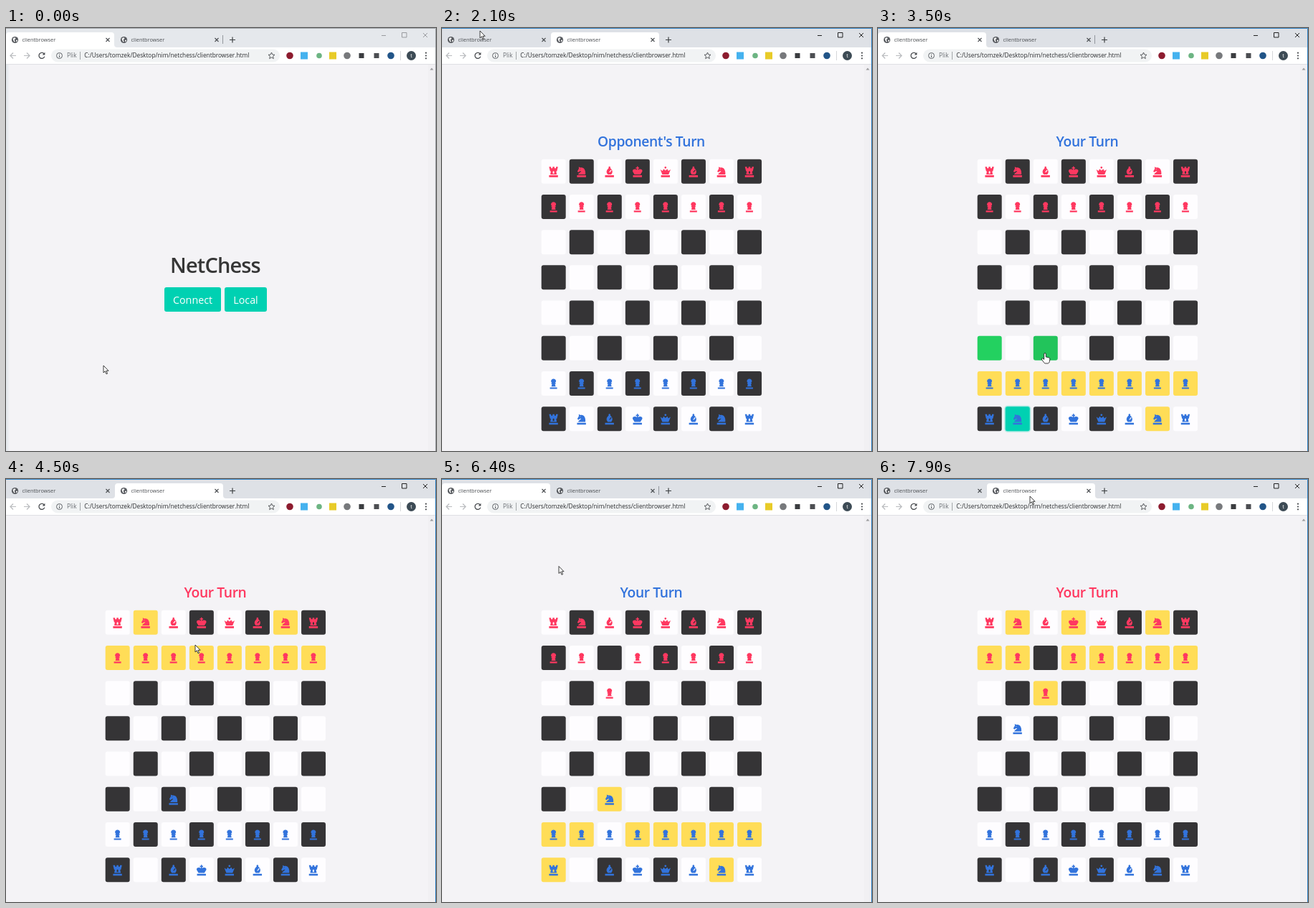
An HTML page for the animation above (8 s loop, 600 by 589 pixels).

```html
<!DOCTYPE html>
<html lang="pl">
<head>
<meta charset="utf-8">
<title>clientbrowser</title>
<style>
  html, body { margin: 0; width: 100%; height: 100%; overflow: hidden; background: #f4f3f6; }
  svg { display: block; width: 600px; height: 589px; }
  text { font-family: "Open Sans", "Noto Sans", sans-serif; }
  .tab { font-size: 7.4px; fill: #4a4d51; }
  .url { font-size: 8.3px; fill: #2b2d30; }
  .btn { font-size: 14.3px; fill: #fff; text-anchor: middle; }
  .logo { font-size: 29px; font-weight: 600; letter-spacing: -.85px; fill: #363636; text-anchor: middle; }
  .turn { font-size: 19.3px; font-weight: 600; letter-spacing: -.4px; text-anchor: middle; }
</style>
</head>
<body>
<svg id="stage" viewBox="0 0 600 589"></svg>
<script>
const LOOP = 8000, STEP = 100;
const RED = '#ff3860', BLUE = '#3273dc';
const FILL = {
  light: ['#fefdff', '#f8f7f9'],
  dark: ['#353436', '#2e2d2f'],
  movable: ['#ffdd57', '#ffd942'],
  target: ['#23d160', '#22c45b'],
  picked: ['#00d1b2', '#00c4a7']
};

// Icons are drawn around 0,0 and share the evenodd rule.
const BASE = 'M-6.2 4.8h12.4v2.6h-12.4z';
const ICONS = {
  R: 'M-6.2-7h2.8v2h2.1v-2h2.6v2h2.1v-2h2.8l-1.5 6.2h-1l.8 4.4h-9l.8-4.4h-1zM-1 0v2.4h2v-2.4a1 1 0 0 0-2 0z' + BASE,
  N: 'M-4.6 3.6C-3.8 1.2-.6.8-.6-1.3L-3.4-.2-4.2.8-5.8-.6-3.7-4.4-3.8-7-1.6-5.8C3-7 6.2-2.4 5.4 3.6zM-2.6-3.7l1.4-.6-.4 1z' + BASE,
  B: 'M0-7.6a1.4 1.4 0 0 1 1 2.3C3.6-3 5-.6 3.4 2.2L2.4 3.6h-4.8L-3.4 2.2C-5-.6-3.4-3.2-1-5.3A1.4 1.4 0 0 1 0-7.6zM1.9-2.8L-.5.3l.9.7L3-2z' + BASE,
  K: 'M-.8-7.6h1.6v1.5h1.5v1.5h-1.5v1.7C3-4.3 6.4-4 6.8-1.6 6.9.4 5 1.6 4.2 3.6h-8.4C-5 1.6-6.9.4-6.8-1.6-6.4-4-3-4.3-.8-2.9v-1.7h-1.5v-1.5h1.5z' + BASE,
  Q: 'M0-7.4a1.4 1.4 0 1 1 0 2.8a1.4 1.4 0 1 1 0-2.8zM-7.2-3.4l3.2 2 1.4-2.6L0-1.8l2.6-2.2L4-1.4l3.2-2L4.4 3.6h-8.8z' + BASE,
  P: 'M0-7.2C2-7.2 3.5-5.8 3.5-4 3.5-2.8 2.9-2 2-1.4h1v1.5h-1l1 3.5h-6l1-3.5h-1v-1.5h1C-2.9-2-3.5-2.8-3.5-4-3.5-5.8-2-7.2 0-7.2zM-5 4.8h10v2.2h-10z'
};
const ARROW = 'M0 0v10l2.3-2.2 1.7 4 1.6-.7-1.7-3.8h3.2z';
const HAND = 'M-1.3-1a1.3 1.3 0 0 1 2.6 0v4l4.2 1q1.5.5 1.4 2l-.6 3.5q-.3 2-2 2.5h-4q-1.5-.3-2.3-1.8l-2.6-4q-.3-1.5 1.2-1.3l2.1 1.5z';

// Pointer path: time, x, y
const PATH = [
  [0, 136, 470], [600, 258, 382], [800, 258, 382], [1000, 235, 250], [1300, 200, 18],
  [1400, 200, 18], [1700, 258, 380], [1900, 258, 380], [2100, 53, 4], [2300, 60, 16],
  [2400, 68, 20], [2700, 165, 440], [3000, 194, 543], [3200, 200, 540], [3500, 233, 455],
  [3600, 233, 455], [4100, 215, 18], [4200, 215, 18], [4500, 264, 231], [4600, 300, 205],
  [4900, 412, 222], [5200, 236, 250], [5400, 234, 298], [5500, 232, 298], [5600, 186, 183],
  [5900, 110, 16], [6000, 110, 16], [6300, 140, 14], [6700, 232, 444], [6800, 232, 444],
  [7200, 195, 355], [7300, 195, 355], [7700, 212, 24], [7900, 212, 24], [8000, 212, 24]
];

// What changes at a click or hover; squares are [row, column].
const EVENTS = [
  [0, { tab: 0, active: false, playing: false, turn: BLUE, pick: null, hint: null }],
  [500, { active: true }],
  [1400, { tab: 1 }],
  [1900, { playing: true }],
  [2300, { tab: 0 }],
  [3100, { pick: [7, 1] }],
  [3600, { pick: null, turn: RED, move: [7, 1, 5, 2] }],
  [4200, { tab: 1 }],
  [5200, { pick: [1, 2] }],
  [5500, { pick: null, turn: BLUE, move: [1, 2, 2, 2] }],
  [5600, { hint: [0, 1] }],
  [5700, { hint: null }],
  [6000, { tab: 0 }],
  [6800, { pick: [5, 2] }],
  [7300, { pick: null, turn: RED, move: [5, 2, 3, 1] }],
  [7700, { tab: 1 }]
];

const stage = document.getElementById('stage');

function add(parent, tag, attrs = {}, text) {
  const el = document.createElementNS('http://www.w3.org/2000/svg', tag);
  set(el, attrs);
  if (text) el.textContent = text;
  parent.appendChild(el);
  return el;
}
function set(el, attrs) {
  for (const k in attrs) el.setAttribute(k, attrs[k]);
}
const show = (el, on) => set(el, { visibility: on ? 'visible' : 'hidden' });
const rect = (p, x, y, width, height, fill, rx = 0) => add(p, 'rect', { x, y, width, height, fill, rx });
const circle = (p, cx, cy, r, fill) => add(p, 'circle', { cx, cy, r, fill });
const line = (p, d, stroke, width = 1) =>
  add(p, 'path', { d, stroke, 'stroke-width': width, fill: 'none' });
const label = (p, x, y, cls, text) => add(p, 'text', { x, y, class: cls }, text);

// Window frame and tabs
const strip = rect(stage, 0, 0, 600, 28, '#dee1e6');
const tabs = [0, 152].map(x => {
  const back = add(stage, 'path', {
    d: `M${x - 4} 27q4 0 4-4V10q0-4 4-4h143q4 0 4 4v13q0 4 4 4z`, fill: '#fff'
  });
  return { x, back };
});
for (const { x } of tabs) {
  circle(stage, x + 12.5, 16.5, 4.6, '#55585d');
  add(stage, 'path', {
    d: `M${x + 9.5} 15l2-1.8 2 .6-.6 1.8-1.6 1 1.4 1.6-.8 1.6-1.2-1.6zM${x + 14} 17l2-.6-.4 2-1.4.8z`, fill: '#fff'
  });
  label(stage, x + 22.5, 19, 'tab', 'clientbrowser');
  line(stage, `M${x + 139.5} 14l5 5m0-5l-5 5`, '#4a4d51', 1.1);
}
const divider = line(stage, 'M302.5 10v12', '#92969c');
line(stage, 'M312 16.5h8m-4-4v8', '#3c4043', 1.2);
const controls = line(stage, 'M524 10.5h6M552.5 6.5h6.5v6.5h-6.5zM582 7l6 6m0-6l-6 6', '#222');

// Toolbar
rect(stage, 0, 27, 600, 23, '#fff');
line(stage, 'M14 38.5h-8m4-4l-4 4 4 4M25 38.5h8m-4-4l4 4-4 4', '#b9bbbe', 1.2);
line(stage, 'M53.2 36a4 4 0 1 0 .6 3.6', '#4a4d51', 1.3);
add(stage, 'path', { d: 'M54.4 33.8v3.8h-3.8z', fill: '#4a4d51' });
rect(stage, 63, 29.5, 319, 18, '#f1f3f4', 9);
add(stage, 'circle', { cx: 74.5, cy: 38.5, r: 4, fill: 'none', stroke: '#5f6368' });
line(stage, 'M74.5 36v1m0 1v3', '#5f6368');
set(label(stage, 85, 41.3, 'url', 'Plik'), { style: 'fill:#6b6f74' });
line(stage, 'M103.5 33v11', '#a3a6aa');
label(stage, 109.3, 41.3, 'url', 'C:/Users/tomzek/Desktop/nim/netchess/clientbrowser.html');
line(stage, 'M370.5 34l1.3 3 3.2.3-2.4 2.1.7 3.2-2.8-1.7-2.8 1.7.7-3.2-2.4-2.1 3.2-.3z', '#4a4d51', .9);
for (const [x, color] of [[396, '#8d1c2f'], [437, '#6db583'], [476, '#77797c'], [537, '#225588']])
  circle(stage, x, 38.5, x === 437 ? 3.8 : 4.8, color);
for (const [x, color] of [[416, '#45b2ef'], [456, '#e8cb28'], [496, '#3b3d40'], [517, '#4c4e52']]) {
  const w = x < 490 ? 10 : 7;
  rect(stage, x - w / 2, 38.5 - w / 2, w, w, color);
}
line(stage, 'M550.5 32v13', '#d5d7da');
circle(stage, 565.5, 38.5, 6.5, '#3d4b55');
set(label(stage, 565.5, 41, 'tab', 't'), { style: 'fill:#fff;text-anchor:middle' });
for (const y of [34.7, 38.5, 42.3]) circle(stage, 586, y, 1.1, '#4a4d51');

// Page
rect(stage, 0, 50, 600, 539, '#f4f3f6');
line(stage, 'M0 50.5h600', '#dfe0e3');
rect(stage, 589, 51, 10, 538, '#f1f0f3');
add(stage, 'path', { d: 'M591.5 58.5h5l-2.5-3z', fill: '#9b9b9e' });
const shade = add(stage, 'g');
[.09, .07, .05, .03, .015].forEach((a, i) => rect(shade, i, 51, 1, 538, `rgba(50,110,130,${a})`));

const menu = add(stage, 'g');
label(menu, 292, 341, 'logo', 'NetChess');
const buttons = [[221, 79, 'Connect'], [305, 59, 'Local']].map(([x, w, name]) => {
  const box = rect(menu, x, 361, w, 34, FILL.picked[0], 3);
  label(menu, x + w / 2, 383.6, 'btn', name);
  return { x, w, box };
});

const game = add(stage, 'g');
const heading = label(game, 292, 164.5, 'turn');
const cellX = c => 138.7 + 39.05 * c;
const cellY = r => 182.7 + 49.22 * r;
const cells = [];
for (let r = 0; r < 8; r++) for (let c = 0; c < 8; c++) {
  const x = cellX(c), y = cellY(r);
  const box = rect(game, x, y, 34, 34, '#fff', 3);
  const icon = add(game, 'path', { transform: `translate(${x + 16.9} ${y + 17.6})`, 'fill-rule': 'evenodd' });
  cells.push({ r, c, x, y, box, icon });
}

const edge = line(stage, '', '#2f80c2');
const pointer = add(stage, 'path', { stroke: '#111', 'stroke-width': .8, 'stroke-linejoin': 'round', fill: '#fff' });

// Board rules, enough to know which squares light up
function newBoard() {
  const row = (s, color) => [...s].map(kind => ({ kind, color }));
  const empty = () => Array(8).fill(null);
  return [row('RNBKQBNR', RED), row('PPPPPPPP', RED), empty(), empty(), empty(), empty(),
    row('PPPPPPPP', BLUE), row('RNBKQBNR', BLUE)];
}
const LINES = [[0, 1], [0, -1], [1, 0], [-1, 0]];
const DIAGONALS = [[1, 1], [1, -1], [-1, 1], [-1, -1]];
const JUMPS = [1, -1].flatMap(a => [2, -2].flatMap(b => [[a, b], [b, a]]));
const REACH = { R: LINES, B: DIAGONALS, K: LINES.concat(DIAGONALS), Q: LINES.concat(DIAGONALS), N: JUMPS };

function moves(board, r, c) {
  const { kind, color } = board[r][c];
  const steps = kind === 'P' ? [[color === RED ? 1 : -1, 0]] : REACH[kind];
  return steps.map(([dr, dc]) => [r + dr, c + dc]).filter(([y, x]) => {
    if (y < 0 || y > 7 || x < 0 || x > 7) return false;
    const other = board[y][x];
    return !other || (kind !== 'P' && other.color !== color);
  });
}

function stateAt(t) {
  const s = { board: newBoard() };
  for (const [start, change] of EVENTS) {
    if (start > t) break;
    Object.assign(s, change);
    if (change.move) {
      const [r, c, y, x] = change.move;
      s.board[y][x] = s.board[r][c];
      s.board[r][c] = null;
    }
  }
  return s;
}

function pointAt(t) {
  const i = PATH.findIndex(k => k[0] > t);
  const [t0, x0, y0] = PATH[i - 1], [t1, x1, y1] = PATH[i];
  const p = (t - t0) / (t1 - t0);
  return [x0 + (x1 - x0) * p, y0 + (y1 - y0) * p];
}

function drawGame(s, over) {
  const me = s.tab ? RED : BLUE, mine = s.turn === me;
  heading.textContent = mine ? 'Your Turn' : "Opponent's Turn";
  set(heading, { fill: s.turn });
  const from = s.pick || s.hint;
  const targets = from ? moves(s.board, ...from) : [];
  let hit = false;
  for (const { r, c, x, y, box, icon } of cells) {
    const piece = s.board[r][c];
    const hover = over(x, y, 34, 34);
    const picked = s.pick && s.pick[0] === r && s.pick[1] === c;
    let look = (r + c) % 2 ? 'dark' : 'light';
    if (picked) look = 'picked';
    else if (targets.some(([a, b]) => a === r && b === c)) look = 'target';
    else if (mine && piece && piece.color === me && moves(s.board, r, c).length) look = 'movable';
    set(box, {
      fill: FILL[look][+hover],
      stroke: picked ? 'rgba(0,209,178,.3)' : 'none', 'stroke-width': 3, 'paint-order': 'stroke'
    });
    set(icon, { d: piece ? ICONS[piece.kind] : '', fill: piece ? piece.color : 'none' });
    hit = hit || hover;
  }
  return hit;
}

function drawMenu(over) {
  let hit = false;
  for (const { x, w, box } of buttons) {
    const hover = over(x, 361, w, 34);
    set(box, { fill: FILL.picked[+hover] });
    hit = hit || hover;
  }
  return hit;
}

function draw(t) {
  const s = stateAt(t);
  const [px, py] = pointAt(t);
  const over = (x, y, w, h) => px >= x && px <= x + w && py >= y && py <= y + h;

  set(strip, { fill: s.active ? '#dee1e6' : '#e5e8ec' });
  set(controls, { stroke: s.active ? '#222' : '#999b9f' });
  set(edge, { d: 'M0 .5h599.5V589', stroke: s.active ? '#2f80c2' : '#a0a4a8' });
  show(shade, !s.active);
  tabs.forEach((tab, i) => show(tab.back, i === s.tab));
  show(divider, s.tab === 0);

  show(menu, !s.playing);
  show(game, s.playing);
  const hit = s.playing ? drawGame(s, over) : drawMenu(over);
  set(pointer, { d: hit ? HAND : ARROW, transform: `translate(${px} ${py})` });
}

const begin = performance.now();
function tick() {
  const t = (performance.now() - begin) % LOOP;
  draw(Math.floor(t / STEP) * STEP);
  requestAnimationFrame(tick);
}
tick();
</script>
</body>
</html>
```
